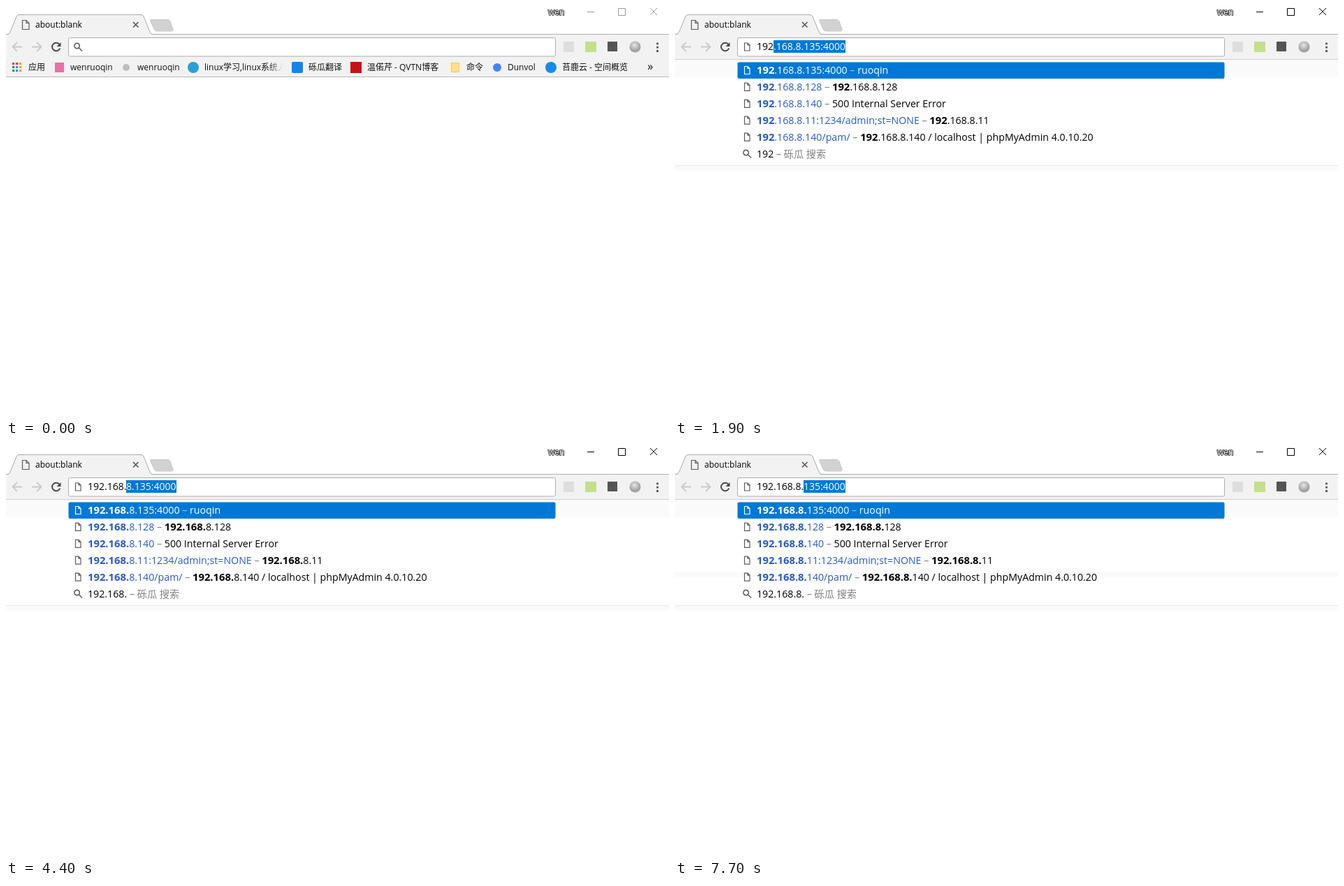
Animation, 949 px wide and 590 px high, one loop 8000 ms. Source, as an HTML page:

```html
<!DOCTYPE html>
<html lang="zh">
<head>
<meta charset="utf-8">
<title>Address bar suggestions</title>
<style>
  html, body { margin: 0; width: 100%; height: 100%; overflow: hidden; background: #fff; }
  svg { display: block; width: 100vw; height: 100vh; }
  text { font: 14px "Open Sans", "Noto Sans CJK SC", "Noto Sans CJK", sans-serif; white-space: pre; }
  .small text, text.small { font-size: 12px; }
  .row text { font-size: 14.2px; }
  .bold { font-size: 14.8px; font-weight: 700; }
  .url { fill: #2a59c8; }
  .dash, .hint { fill: #808080; }
  .selected text, .selected .url { fill: #fff; }
  .selected .dash, .selected .hint { fill: #a3cdf2; }
  .icon { fill: none; stroke: #5a5a5a; stroke-width: 1.2; }
  .icon.star { fill: #5a5a5a; stroke: none; }
  .icon.search { stroke-width: 1.5; }
  .selected .icon { stroke: #fff; }
</style>
</head>
<body>
<svg viewBox="0 0 949 590">
  <defs>
    <linearGradient id="fade" gradientUnits="userSpaceOnUse" x1="376" x2="396">
      <stop stop-color="#111"/><stop offset="1" stop-color="#111" stop-opacity="0"/>
    </linearGradient>
    <radialGradient id="ball" cx=".45" cy=".35">
      <stop stop-color="#e6e6e6"/><stop offset="1" stop-color="#a2a2a2"/>
    </radialGradient>
  </defs>
  <rect width="949" height="590" fill="#fff"/>

  <!-- Tab strip -->
  <rect y="40" width="949" height="62" fill="#f2f2f2"/>
  <path d="M0 40.5H949" stroke="#b0b0b0"/>
  <path d="M0 41H2Q5 40 6 37L15 15Q16 12.500 19 12.500H193Q196 12.500 197 15L206 37Q207 40 210 41Z" fill="#f2f2f2"/>
  <path d="M0 40.500H2Q5 40 6 37L15 15Q16 12.500 19 12.500H193Q196 12.500 197 15L206 37Q207 40 210 40.500" fill="none" stroke="#a8a8a8"/>
  <path d="M208 19.500H231Q234 19.500 235 22L239 33Q240 36 237 36H216Q213 36 212 33L207 22Q206 19.500 208 19.500Z" fill="#d2d2d2" stroke="#c8c8c8"/>
  <path d="M23.500 20.500H29L33 24.500V33.500H23.500ZM29 20.500V24.500H33" class="icon"/>
  <text x="42" y="31" class="small">about:blank</text>
  <path d="M182 23L189.500 30.500M189.500 23L182 30.500" stroke="#555" stroke-width="1.600"/>
  <text x="776" y="13" class="small" fill="#fff" stroke="#222" stroke-width="1.600" paint-order="stroke">wen</text>
  <path id="controls" d="M832 8.500H842M876.500 3.500H886.500V13.500H876.500ZM922 3L932 13M932 3L922 13" fill="none"/>

  <!-- Toolbar -->
  <g fill="none" stroke="#c9c9c9" stroke-width="1.800">
    <path d="M23 58.500H10M16 52L9.500 58.500L16 65"/>
    <path d="M37 58.500H50M44 52L50.500 58.500L44 65"/>
    <path d="M76.500 55A5.800 5.800 0 1 0 77.300 60.500" stroke="#484848" stroke-width="2"/>
  </g>
  <path d="M78.500 52V58H72.500Z" fill="#484848"/>
  <rect x="89.500" y="45.500" width="697" height="26.500" rx="2" fill="#fff" stroke="#adadad"/>
  <rect x="798" y="51" width="15" height="15" fill="#dedede"/>
  <rect x="829" y="51" width="16" height="15" fill="#c3e08a"/>
  <rect x="861" y="51" width="14" height="14" fill="#555"/>
  <circle cx="900.500" cy="58.500" r="8" fill="url(#ball)"/>
  <path d="M932.500 52.500V66" stroke="#555" stroke-width="2.800" stroke-dasharray="2.800 2.500"/>

  <g id="bookmarks" class="small" fill="#111"></g>
  <g id="live"></g>
</svg>
<script>
const LOOP = 8000;
const FULL = '192.168.8.135:4000';
const TEXT_X = 117;
const byId = id => document.getElementById(id);
const pen = document.createElement('canvas').getContext('2d');

// Pixel column where a text typed into the address box ends.
const endOf = text => {
  pen.font = '14px "Open Sans", sans-serif';
  return Math.round(TEXT_X + pen.measureText(text).width);
};
const rect = (x, y, w, h, fill, rx = 0) =>
  `<rect x="${x}" y="${y}" width="${w}" height="${h}" fill="${fill}" rx="${rx}"/>`;
const circle = (x, y, r, fill) => `<circle cx="${x}" cy="${y}" r="${r}" fill="${fill}"/>`;
const label = (x, y, text, attrs = '') => `<text x="${x}" y="${y}" ${attrs}>${text}</text>`;

// Icons are drawn around their own centre.
const ICONS = {
  page: 'M-3.500 -5.500H1L4 -2.500V5.500H-3.500ZM1 -5.500V-2.500H4',
  search: 'M2.300 -1.500A3.700 3.700 0 1 0 -5.100 -1.500A3.700 3.700 0 1 0 2.300 -1.500M1.300 1.300L6 6',
  star: 'M0 -6L1.700 -2H6L2.600 .7L3.800 5L0 2.500L-3.800 5L-2.600 .7L-6 -2H-1.700Z'
};
const icon = (name, y) =>
  `<path class="icon ${name}" d="${ICONS[name]}" transform="translate(103 ${y})"/>`;

function drawBookmarks() {
  const dots = ['#db4437', '#db4437', '#f4a000', '#0f9d58', '#4285f4', '#f4a000', '#0f9d58', '#4285f4', '#f4a000'];
  const titles = [
    [32, '应用'], [92, 'wenruoqin'], [188, 'wenruoqin'], [433, '砾瓜翻译'],
    [517, '温偌芹 - QVTN博客'], [659, '命令'], [718, 'Dunvol'], [796, '苔鹿云 - 空间概览']
  ];
  byId('bookmarks').innerHTML =
    dots.map((c, i) => rect(9 + i % 3 * 5, 81 + Math.floor(i / 3) * 5, 3.2, 3.2, c)).join('') +
    rect(70, 81, 13, 14, '#ea6fa8') + circle(172, 88, 5, '#bdbdbd') +
    circle(268, 88, 8, '#2a9fdc') + rect(409, 80, 16, 16, '#1583ec', 2) +
    rect(493, 80, 16, 16, '#c90f18') + circle(703, 88, 6, '#4285f4') + circle(780, 88, 8, '#168cf0') +
    '<path d="M637.500 81.500H648.500V94.500H637.500Z" fill="#ffe08a" stroke="#efc65c"/>' +
    titles.map(([x, text]) => label(x, 92, text)).join('') +
    label(284, 92, 'linux学习,linux系统入', 'fill="url(#fade)"') +
    label(918, 92, '»', 'style="font-size:17px"') +
    rect(0, 101, 949, 1, '#b8b8b8');
}

// Text between asterisks is bold.
const mark = text => text.split('*')
  .map((part, i) => i % 2 ? `<tspan class="bold">${part}</tspan>` : part).join('');

const visit = (url, title, name = 'page') => ({ icon: name, url, title });
const query = (text, hint = '') => ({ icon: 'search', text, hint });
const engine = typed => query(typed, '砾瓜 搜索');

const HISTORY = [
  [FULL, 'ruoqin'],
  ['192.168.8.128', '192.168.8.128'],
  ['192.168.8.140', '500 Internal Server Error'],
  ['192.168.8.11:1234/admin;st=NONE', '192.168.8.11'],
  ['192.168.8.140/pam/', '192.168.8.140 / localhost | phpMyAdmin 4.0.10.20']
];
const visits = typed => HISTORY.map(pair =>
  visit(...pair.map(text => text.replace(typed, `*${typed}*`))));

const completed = (at, typed, rows = [...visits(typed), engine(typed)], edges = [228]) =>
  ({ at, typed, rest: FULL.slice(typed.length), rows, edges });

const firstRows = [
  visit('*1*92.168.8.135:4000', 'ruoqin'),
  visit('*1*72.18.0.1', ''),
  visit('*1*92.168.8.128', '*1*92.168.8.128'),
  visit('fanyi.baidu.com/?aldtype=*1*6047#auto/zh', '砾瓜翻译', 'star'),
  visit('*1*92.*1*68.8.*11*:*1*234/admin;st=NONE', '*1*92.168.8.11'),
  engine('1')
];
const missRows = [
  engine('192.168.9'), query('192.168.9*.1*'), query('192.168.9*9.1*'), query('*192.168.0.1*')
];
const miss = { typed: '192.168.9', rows: missRows };
const bothEdges = [180, 228];

const STATES = [
  { at: 0, inactive: true },
  { at: 600, caret: true },
  { at: 1200 },
  completed(1700, '1', firstRows),
  completed(1800, '19'),
  completed(1900, '192'),
  completed(2100, '192.'),
  completed(2500, '192.1'),
  completed(3000, '192.168'),
  completed(4400, '192.168.'),
  { at: 5800, ...miss, caret: true },
  { at: 6200, ...miss },
  { at: 6700, ...miss, caret: true },
  { at: 7000, typed: '192.168.', caret: true, edges: bothEdges,
    rows: [engine('192.168.'), ...visits('192.168.')] },
  completed(7300, '192.168.8', undefined, bothEdges),
  completed(7700, '192.168.8.', undefined, bothEdges)
];

function drawRow(row, i) {
  const y = 92 + i * 23.9;
  const main = row.url ? `<tspan class="url">${mark(row.url)}</tspan>` : mark(row.text);
  const tail = row.title || row.hint;
  const dash = '<tspan class="dash"> – </tspan>';
  const more = tail ? `${dash}<tspan class="${row.hint ? 'hint' : ''}">${mark(tail)}</tspan>` : '';
  return `<g class="row ${i ? '' : 'selected'}">` +
    (i ? '' : rect(89.5, 80.5, 697, 23.5, '#0078d7', 2)) +
    icon(row.icon, y) + label(TEXT_X, Math.round(y + 5), main + more) + '</g>';
}

function drawDropdown({ rows, edges = [] }) {
  return rect(0, 76, 949, 160, '#fff') +
    rect(0, 76, 949, 1, '#d2d2d2') + rect(0, 77, 949, 25, '#fafafa') +
    edges.map(y => rect(0, y, 949, 8, '#fafafa')).join('') +
    (edges.includes(228) ? rect(0, 228, 949, 1, '#e9e9e9') : '') +
    rows.map(drawRow).join('');
}

function drawInput({ typed = '', rest = '', caret }) {
  const end = endOf(typed);
  const selection = rest && rect(end, 49, endOf(FULL) - end, 18, '#0078d7') +
    label(end, 63, rest, 'fill="#fff"');
  return icon(rest ? 'page' : 'search', 58.5) + label(TEXT_X, 63, typed) + selection +
    (caret ? rect(typed ? end : 116, 49, 1, 18, '#000') : '');
}

let shown;
function frame() {
  const t = performance.now() % LOOP;
  const state = STATES.filter(s => s.at <= t).pop();
  if (state !== shown) {
    shown = state;
    byId('controls').setAttribute('stroke', state.inactive ? '#999' : '#000');
    byId('live').innerHTML = (state.rows ? drawDropdown(state) : '') + drawInput(state);
  }
  requestAnimationFrame(frame);
}

drawBookmarks();
frame();
</script>
</body>
</html>
```
